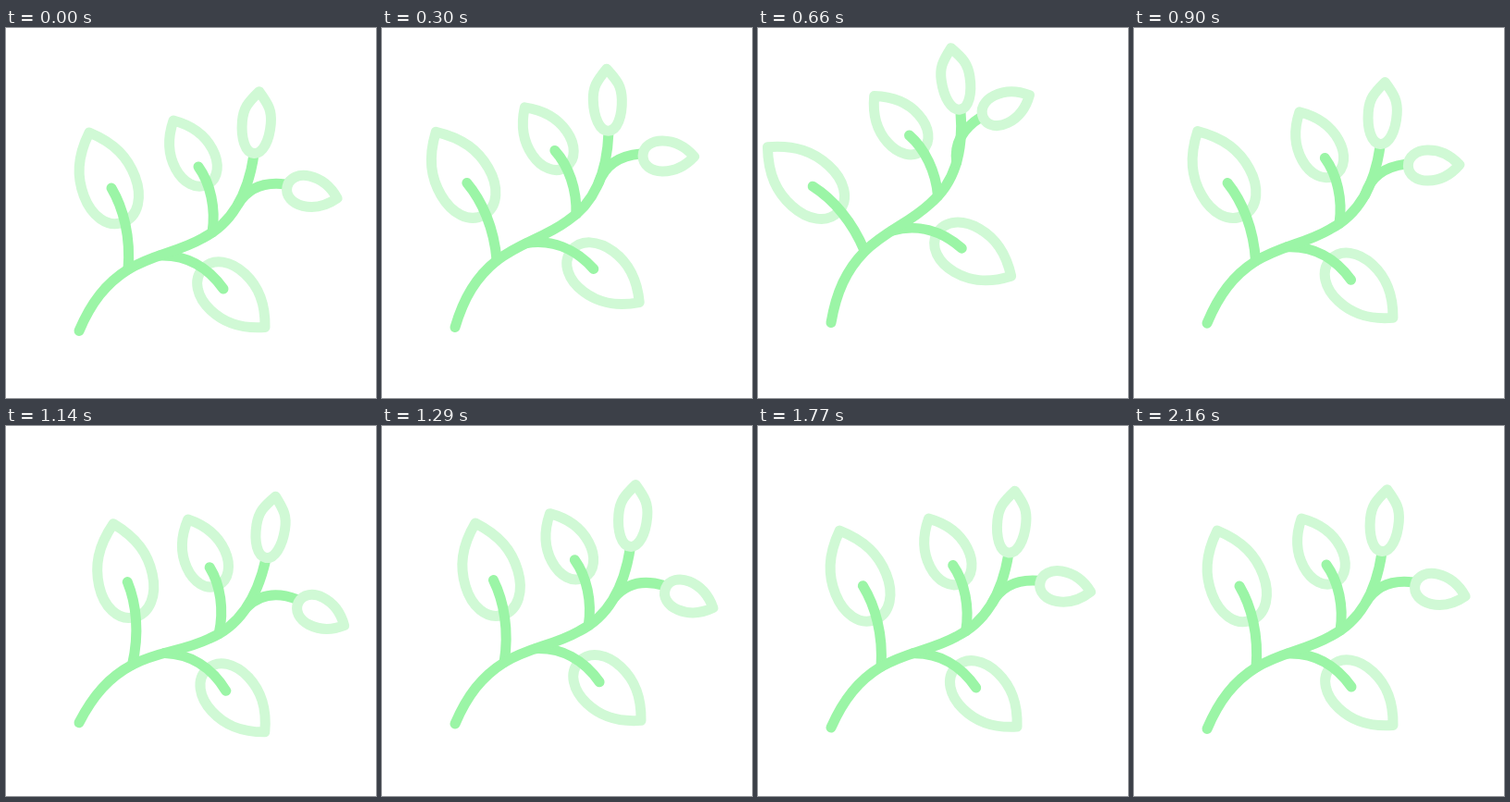
These frames come from a looping animation (400x400 px, 2.19 s). An HTML page:

```html
<!DOCTYPE html>
<html lang="en">
<head>
<meta charset="utf-8">
<title>Swaying branch</title>
<style>
  html, body { margin: 0; width: 100%; height: 100%; overflow: hidden; background: #fff; }
  svg { display: block; width: 100vw; height: 100vh; }
  path { fill: none; stroke: #9bf5a6; stroke-width: 11; stroke-linecap: round; stroke-linejoin: round; }
  .leaf { stroke: #d0f9d5; }
</style>
</head>
<body>
<svg viewBox="0 0 400 400">
  <g id="branch">
    <g id="low">
      <path class="leaf" data-leaf="126.5 210 90 113 29.5 .4"/>
      <path d="M132 261C135 226 127 195 114 173"/>
    </g>
    <path class="leaf" data-leaf="218 169 181 100 22.5 .4"/>
    <path class="leaf" data-leaf="213 260 280 323.5 27 .4"/>
    <path d="M223 221C227 195 221 168 208 150"/>
    <path d="M166 246C194 245 218 258 235 282"/>
    <path d="M79 327.5C92 297 108 276 132 261C160 244 185 243 213 227C247 210 262 177 268 137"/>
    <path class="leaf" data-leaf="268 135.5 273.7 68.7 15.5 .5"/>
    <g id="high">
      <path d="M251 190.5C261 174 278 166 302 169"/>
      <path class="leaf" data-leaf="304 171.5 358 184 16.5 .38"/>
    </g>
  </g>
</svg>
<script>
const LOOP = 2190, STEP = 30;
const byId = id => document.getElementById(id);

// Teardrop from base to tip; w is the half width, m the belly position along the axis.
function leafPath(x, y, tipX, tipY, w, m) {
  const dx = tipX - x, dy = tipY - y, len = Math.hypot(dx, dy);
  const at = (u, v) => [x + dx * u - dy / len * v * w, y + dy * u + dx / len * v * w];
  return `M${at(1, 0)}C${at(.8, .75)} ${at(m + .21, 1)} ${at(m, 1)}` +
    `C${at(m / 2.2, 1)} ${at(0, .62)} ${at(0, 0)}` +
    `C${at(0, -.62)} ${at(m / 2.2, -1)} ${at(m, -1)}` +
    `C${at(m + .21, -1)} ${at(.8, -.75)} ${at(1, 0)}Z`;
}
for (const p of document.querySelectorAll('[data-leaf]'))
  p.setAttribute('d', leafPath(...p.dataset.leaf.split(' ').map(Number)));

// Eased value between [time, value] keys.
function ease(keys, t) {
  const i = keys.findIndex(k => k[0] > t);
  if (i < 0) return keys[keys.length - 1][1];
  if (i === 0) return keys[0][1];
  const [t0, a] = keys[i - 1], [t1, b] = keys[i], f = (t - t0) / (t1 - t0);
  return a + (b - a) * f * f * (3 - 2 * f);
}

const rootY = [[0, 327.5], [650, 318.5], [2160, 327.5]];
const sway = [[0, 0], [620, -13.8], [1055, 4.9], [1470, -3.1], [1830, 1.2], [2160, 0]];
const trail = (a, b, c, d) => [[130, 0], [710, a], [1200, b], [1630, c], [1980, d], [2160, 0]];
const lowSway = trail(-14.1, 5, -3.5, .8);
const highSway = trail(-26.5, 11.5, -7.2, 1.5);

function draw(now) {
  const t = Math.floor(now % LOOP / STEP) * STEP;
  const set = (id, value) => byId(id).setAttribute('transform', value);
  set('branch', `translate(79 ${ease(rootY, t)}) rotate(${ease(sway, t)}) translate(-79 -327.5)`);
  set('low', `rotate(${ease(lowSway, t)} 131 260)`);
  set('high', `rotate(${ease(highSway, t)} 251 190.5)`);
}

const start = performance.now();
function tick() {
  draw(performance.now() - start);
  requestAnimationFrame(tick);
}
tick();
</script>
</body>
</html>
```
